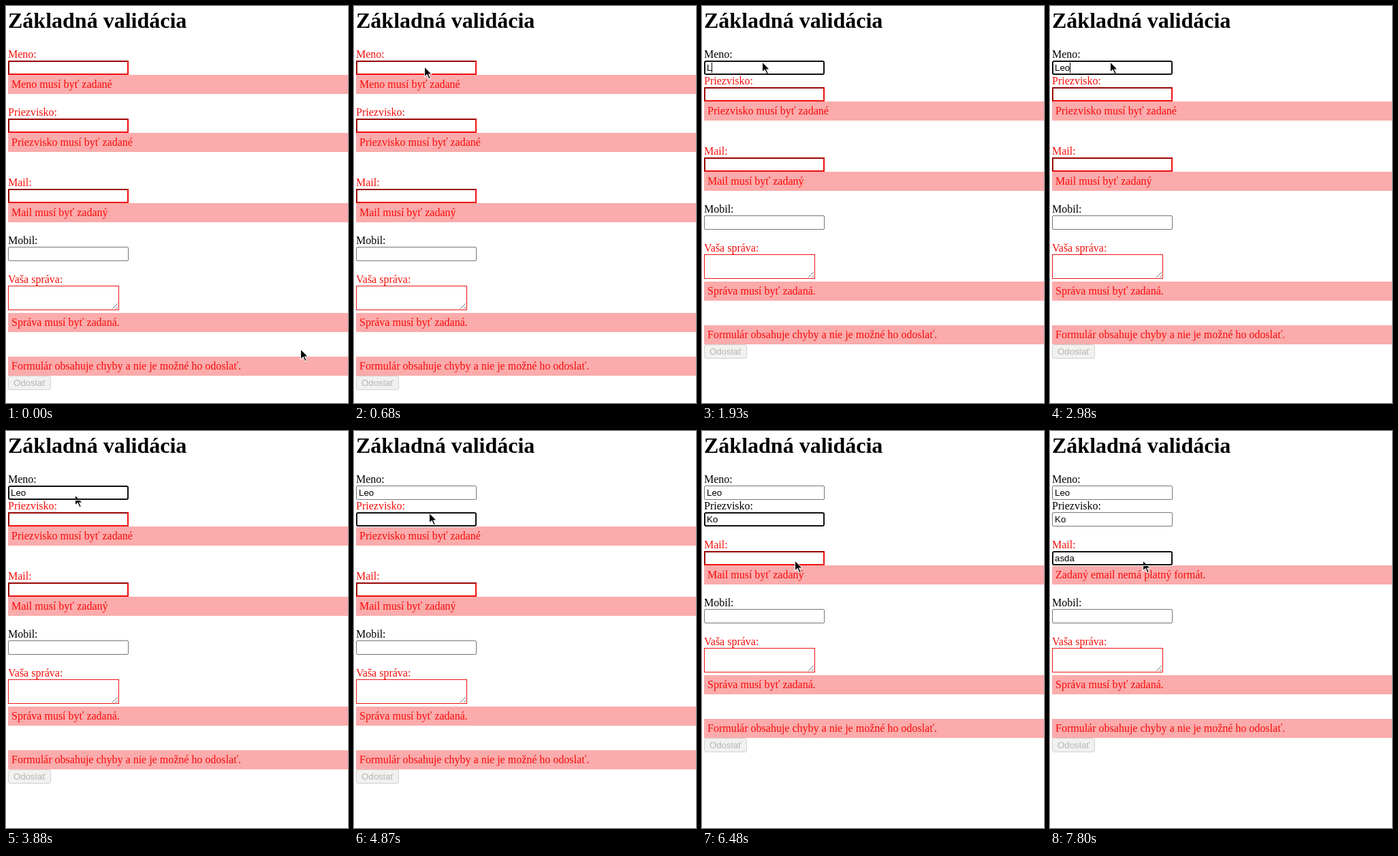
An HTML page for the animation above (8000 ms loop, 502 by 582 pixels).

```html
<!DOCTYPE html>
<html lang="sk">
<head>
<meta charset="utf-8">
<title>Základná validácia</title>
<style>
  html, body { margin: 0; width: 100%; height: 100%; overflow: hidden; background: #fff; }
  #stage { position: relative; width: 502px; height: 582px; overflow: hidden;
    font: 16px/18px "Liberation Serif", "Times New Roman", serif; color: #000; }
  #stage * { box-sizing: border-box; white-space: pre; }
  h1 { position: absolute; left: 3px; top: 3px; margin: 0; font-size: 32px; line-height: 37px; }
  #form { position: absolute; left: 3px; top: 62px; width: 499px;
    display: flex; flex-direction: column; align-items: flex-start; }
  .gap { margin-top: 18px; }
  .label.invalid { color: #f50f0a; }
  .input { position: relative; width: 177px; height: 21px; }
  .input::before { content: ""; position: absolute; inset: 0; box-sizing: border-box;
    border: 1px solid #767676; border-radius: 2px; }
  .input.invalid::before { border: 2px solid; border-color: #9a0505 #f01010 #f01010 #9a0505; border-radius: 0; }
  .input.focus { z-index: 1; }
  .input.focus::before { border: 2px solid #101010; border-radius: 3px; box-shadow: 0 0 0 1px #fff; }
  .text, .caret { position: absolute; left: 4px; top: 3px; }
  .text, .button { font: 13.333px/15px "Liberation Sans", Arial, sans-serif; }
  .caret { width: 1px; height: 15px; background: #000; }
  .message { width: 100%; height: 28px; padding: 5px; margin-bottom: 18px; background: #fbabab; color: #fa0a0a; }
  .area { position: relative; width: 163px; height: 36px; margin-bottom: 4px; border: 1px solid #f01414; }
  .area svg { position: absolute; right: 0; bottom: 0; }
  .summary { margin-bottom: 0; }
  .button { width: 63px; height: 21px; padding: 2px 0; text-align: center; color: #b8b4b4;
    background: #f1f1ef; border: 1px solid #d3d1d3; border-radius: 3px; }
  #pointer { position: absolute; left: 0; top: 0; overflow: visible; }
</style>
</head>
<body>
<div id="stage">
  <h1>Základná validácia</h1>
  <div id="form"></div>
  <svg id="pointer" width="12" height="20">
    <path d="M0 0V17L4 13.5L6.8 19.5L9.8 18.3L7.3 12.4H12Z" fill="#fff"/>
    <path d="M1 2.2V14.8L4.3 11.8L7.3 18.2L8.6 17.6L5.8 11.4H10Z" fill="#000"/>
  </svg>
</div>
<script>
const LOOP = 8000, BLINK = 560, FRAME = 67;
const form = document.getElementById('form');
const pointer = document.getElementById('pointer');

function add(parent, className, text = '') {
  const el = document.createElement('div');
  el.className = className;
  el.textContent = text;
  parent.append(el);
  return el;
}

function addField(name, className = '') {
  const label = add(form, 'label ' + className, name);
  const input = add(form, 'input');
  return { label, input, text: add(input, 'text'), caret: add(input, 'caret') };
}

function addValidated(name, className, rule) {
  return { ...addField(name, className), message: add(form, 'message'), ...rule };
}

const required = message => value => value ? '' : message;

// keys: the moment each letter is typed
const fields = [
  addValidated('Meno:', '', {
    value: 'Leo', focus: 810, keys: [1930, 2840, 2980],
    check: required('Meno musí byť zadané')
  }),
  addValidated('Priezvisko:', '', {
    value: 'Ko', focus: 4310, keys: [5290, 5570],
    check: required('Priezvisko musí byť zadané')
  }),
  addValidated('Mail:', 'gap', {
    value: 'asda', focus: 6690, keys: [0, 1, 2, 3].map(i => 6970 + 86 * i),
    check: value => value ? 'Zadaný email nemá platný formát.' : 'Mail musí byť zadaný'
  })
];
addField('Mobil:').caret.hidden = true;
add(form, 'label invalid gap', 'Vaša správa:');
add(form, 'area').innerHTML =
  '<svg width="10" height="10"><path d="M1 9L9 1M6 9L9 6" stroke="#777" fill="none"/></svg>';
add(form, 'message', 'Správa musí byť zadaná.');
add(form, 'message summary gap', 'Formulár obsahuje chyby a nie je možné ho odoslať.');
add(form, 'button', 'Odoslať');

const home = { x: 432, y: 502 };
const moves = [
  { begin: 70, end: 400, x: 108, y: 91 },
  { begin: 680, end: 810, x: 88, y: 81 },
  { begin: 3540, end: 3670, x: 212, y: 70 },
  { begin: 3740, end: 3880, x: 101, y: 93 },
  { begin: 4100, end: 4380, x: 110, y: 119 },
  { begin: 5990, end: 6480, x: 136, y: 189 }
];

// Eased progress that advances once per recorded frame.
function progress(t, { begin, end }) {
  if (t < begin) return 0;
  if (t >= end) return 1;
  const steps = Math.round((end - begin) / FRAME);
  const p = (Math.floor((t - begin) / (end - begin) * steps) + 1) / (steps + 1);
  return p * p * (3 - 2 * p);
}

function pointerAt(t) {
  return moves.reduce((from, move) => {
    const p = progress(t, move);
    return { x: from.x + (move.x - from.x) * p, y: from.y + (move.y - from.y) * p };
  }, home);
}

function renderField(field, t, focused) {
  const typed = field.keys.filter(time => time <= t);
  const value = field.value.slice(0, typed.length);
  const error = field.check(value);

  field.text.textContent = value;
  field.message.textContent = error;
  field.message.style.display = error ? '' : 'none';
  field.label.classList.toggle('invalid', Boolean(error));
  field.input.classList.toggle('invalid', Boolean(error));
  field.input.classList.toggle('focus', focused);

  const idle = t - (typed.pop() ?? field.focus);
  field.caret.hidden = !focused || Math.floor(idle / BLINK) % 2 === 1;
  field.caret.style.left = Math.round(4 + field.text.getBoundingClientRect().width) + 'px';
}

function render(t) {
  const active = fields.filter(field => field.focus <= t).pop();
  fields.forEach(field => renderField(field, t, field === active));
  const { x, y } = pointerAt(t);
  pointer.style.transform = `translate(${Math.round(x)}px, ${Math.round(y)}px)`;
}

const start = performance.now();
function tick() {
  render((performance.now() - start) % LOOP);
  requestAnimationFrame(tick);
}
tick();
</script>
</body>
</html>
```
